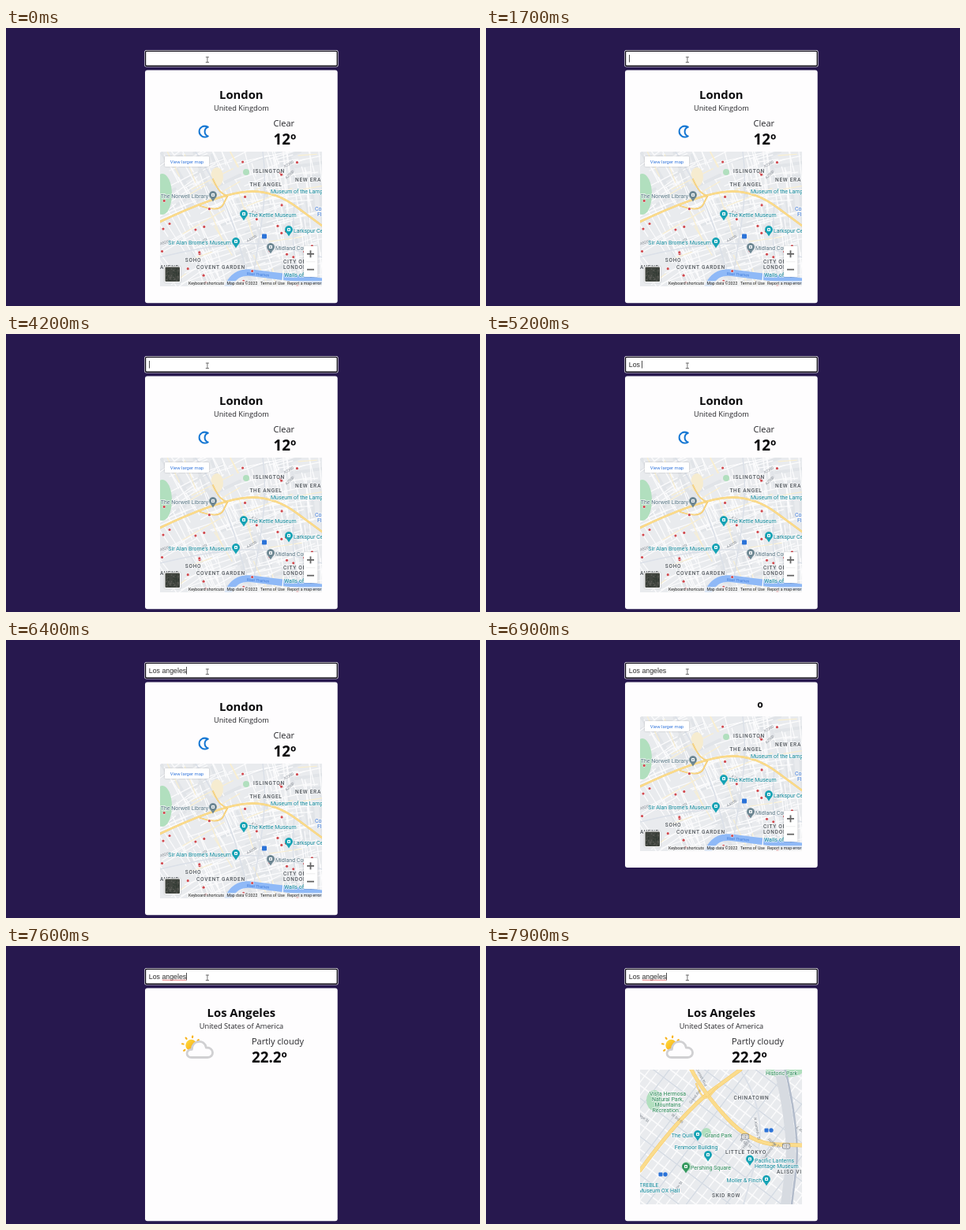
These frames come from a looping animation (600x353 px, 8 s). An HTML page with a canvas:

```html
<!DOCTYPE html>
<html lang="en">
<head>
<meta charset="utf-8">
<title>Weather search</title>
<style>
html, body { margin: 0; width: 100%; height: 100%; overflow: hidden; background: #27184e; }
canvas { display: block; width: 600px; height: 353px; }
</style>
</head>
<body>
<canvas id="stage"></canvas>
<script>
const LOOP = 8000, BLINK = 530;
const SUBMIT = 6800, REPLY = 7000, READY = 7450;
const MAP = { x: 195, y: 157, w: 205, h: 171 };
const UI = '"Open Sans", "Noto Sans", sans-serif';
const LABEL = 'Roboto, Arial, sans-serif';
const FIELD = '"Liberation Sans", Arial, sans-serif';
const INK = '#0b0b0d', TEAL = '#128a9c', GREEN = '#2b8a57', SLATE = '#5c7886', BLUE = '#3c78d8';
const MINOR = '#dbe0e8', PARK = '#b1dfbe';
const dpr = window.devicePixelRatio || 1;

function surface(canvas, w, h) {
  canvas.width = Math.round(w * dpr);
  canvas.height = Math.round(h * dpr);
  const c = canvas.getContext('2d');
  c.scale(dpr, dpr);
  return c;
}

function random(seed) {
  return () => (seed = (seed * 16807) % 2147483647) / 2147483647;
}

function text(c, str, x, y, font, color, align = 'left', halo = false) {
  c.font = font;
  c.textAlign = align;
  if (halo) {
    c.lineWidth = 1.8;
    c.strokeStyle = '#f5f6f8b0';
    c.strokeText(str, x, y);
  }
  c.fillStyle = color;
  c.fillText(str, x, y);
}

function box(c, x, y, w, h, r, color) {
  c.fillStyle = color;
  c.beginPath();
  c.roundRect(x, y, w, h, r);
  c.fill();
}

function blob(c, x, y, rx, ry, color) {
  c.fillStyle = color;
  c.beginPath();
  c.ellipse(x, y, rx, ry, 0, 0, 7);
  c.fill();
}

// Smooth line steered by a few key points.
function road(c, pts, width, color) {
  c.lineWidth = width;
  c.strokeStyle = color;
  c.beginPath();
  c.moveTo(...pts[0]);
  for (let i = 1; i < pts.length - 1; i++) {
    const [x, y] = pts[i], [u, v] = pts[i + 1];
    c.quadraticCurveTo(x, y, (x + u) / 2, (y + v) / 2);
  }
  c.lineTo(...pts[pts.length - 1]);
  c.stroke();
}

function highway(c, pts, width) {
  road(c, pts, width + 0.8, '#f3c769');
  road(c, pts, width, '#fbdc8c');
}

function turned(c, str, x, y, angle, color = '#81878f') {
  c.save();
  c.translate(x, y);
  c.rotate(angle);
  text(c, str, 0, 1.5, `4.7px ${LABEL}`, color, 'center');
  c.restore();
}

function place(c, str, x, y, color, align) {
  text(c, str, x, y, `7px ${LABEL}`, color, align, true);
}

function district(c, str, x, y, align = 'center') {
  c.letterSpacing = '0.7px';
  text(c, str, x, y, `500 6.6px ${LABEL}`, '#51565c', align, true);
  c.letterSpacing = '0px';
}

function pin(c, x, y, color) {
  c.fillStyle = color;
  c.beginPath();
  c.arc(x, y - 1, 5, 2.6, 0.54);
  c.quadraticCurveTo(x + 2, y + 4, x, y + 7.5);
  c.quadraticCurveTo(x - 2, y + 4, x - 4.3, y + 1.6);
  c.fill();
  box(c, x - 2, y - 3, 4, 4, 0.8, '#fff');
  box(c, x - 0.8, y - 1.7, 1.6, 1.6, 0, color);
}

// A pin with its label on one side.
function spot(c, str, x, y, color, left) {
  pin(c, x, y, { [TEAL]: '#16a3b5', [GREEN]: '#34985e', [SLATE]: '#6d8793' }[color]);
  const side = left ? -6 : 6;
  str.split('\n').forEach((s, i) => place(c, s, x + side, y + 3 + i * 7, color, left ? 'right' : 'left'));
}

function newMap(paint) {
  const canvas = document.createElement('canvas');
  const c = surface(canvas, MAP.w, MAP.h);
  c.translate(-MAP.x, -MAP.y);
  c.lineJoin = c.lineCap = 'round';
  c.fillStyle = '#e9ebee';
  c.fillRect(MAP.x, MAP.y, MAP.w, MAP.h);
  paint(c, random(71));
  return canvas;
}

function scatter(rnd, count, put) {
  for (let i = 0; i < count; i++) put(MAP.x + rnd() * MAP.w, MAP.y + rnd() * MAP.h, i);
}

function streets(c, rnd, count, color, width) {
  scatter(rnd, count, (x, y, i) => {
    const a = -0.35 + (x - 300) * 0.002 + (i % 2) * Math.PI / 2 + (rnd() - 0.5) * 0.3;
    const l = 8 + rnd() * 24, dx = Math.cos(a) * l, dy = Math.sin(a) * l;
    road(c, [[x - dx, y - dy], [x + dx, y + dy]], width, color);
  });
}

function paintLondon(c, rnd) {
  streets(c, rnd, 50, '#e1e4e8', 4);
  streets(c, rnd, 230, '#fcfcfd', 1.2);
  streets(c, rnd, 22, '#faefcf', 1.1);
  blob(c, 198, 211, 12, 26, PARK);
  blob(c, 267, 189, 8, 12, '#f6ecd0');
  blob(c, 304, 183, 4, 4, PARK);

  road(c, [[325, 157], [331, 200], [314, 308]], 1.5, MINOR);
  road(c, [[240, 157], [278, 215], [305, 310]], 1.5, MINOR);
  road(c, [[195, 291], [300, 265], [400, 291]], 1.5, MINOR);
  road(c, [[365, 222], [362, 265], [368, 310]], 1.5, MINOR);
  highway(c, [[195, 246], [262, 214], [335, 203], [400, 251]], 1.8);
  highway(c, [[246, 226], [270, 234], [280, 214]], 1);
  highway(c, [[262, 192], [268, 206], [280, 214]], 1);

  road(c, [[281, 328], [290, 308], [335, 314], [402, 322]], 8.5, '#8fb9f7');
  road(c, [[351, 308], [350, 323]], 1.3, '#fff');
  turned(c, 'River Thames', 319, 313, 0.07, BLUE);
  scatter(rnd, 7, (x, y, i) => turned(c, 'A' + (5200 - i * 600), x, y, (rnd() - 0.5) * 2));
  scatter(rnd, 34, (x, y) => {
    blob(c, x, y, 2, 2, '#fff');
    blob(c, x, y, 1.6, 1.6, '#cf4a50');
  });
  box(c, 324, 261.5, 6, 6, 1, '#2b73d8');

  district(c, 'ISLINGTON', 333, 184);
  district(c, 'THE ANGEL', 329, 201);
  district(c, 'NEW ERA ESTATE', 366, 195, 'left');
  district(c, 'SOHO', 237, 297);
  district(c, 'COVENT GARDEN', 272, 306);
  district(c, 'AVEND', 195, 306, 'left');
  district(c, 'CITY OF', 351, 299, 'left');
  district(c, 'LONDON', 351, 306, 'left');
  place(c, 'Museum of the Lamp', 335, 209.5, TEAL);
  place(c, 'Walls of', 352, 316, TEAL);
  place(c, 'Col', 391, 232, BLUE);
  place(c, 'Fl', 394, 239, BLUE);
  spot(c, 'The Norwell Library', 262, 213, SLATE, true);
  spot(c, 'The Kettle Museum', 301, 237, TEAL);
  spot(c, "Sir Alan Brome's Museum", 291, 272, TEAL, true);
  spot(c, 'Larkspur Centre', 358, 257, TEAL);
  spot(c, 'Midland Court', 335, 279, SLATE);
  paintControls(c, rnd);
}

function paintControls(c, rnd) {
  c.shadowColor = '#0004';
  c.shadowBlur = 2 * dpr;
  box(c, 201, 163, 56, 13, 1, '#fff');
  box(c, 377, 277, 17.5, 39, 1, '#fff');
  box(c, 200.5, 302.5, 20.5, 20.5, 1.5, '#fff');
  c.shadowBlur = 0;
  text(c, 'View larger map', 229, 171.5, `5.9px ${LABEL}`, '#3477dc', 'center');
  box(c, 380, 296.5, 11.5, 0.7, 0, '#e4e4e4');
  box(c, 381, 286, 9, 1.8, 0, '#666');
  box(c, 384.6, 282.4, 1.8, 9, 0, '#666');
  box(c, 381, 305.8, 9, 1.8, 0, '#666');
  box(c, 201.5, 303.5, 18.5, 18.5, 1, '#41453f');
  for (let i = 0; i < 45; i++) {
    box(c, 202 + rnd() * 16, 304 + rnd() * 16, 1.5, 1.5, 0, i % 2 ? '#5b5c57' : '#313a33');
  }
  box(c, 230, 321, 170, 7, 0, '#f5f5f5c0');
  const small = `5.2px ${LABEL}`;
  text(c, 'Keyboard shortcuts', 231, 326, small, '#222');
  text(c, 'Map data ©2022', 279.5, 326, small, '#222');
  text(c, 'Terms of Use', 322, 326, small, '#222');
  text(c, 'Report a map error', 356, 326, small, '#222');
}

const SLOPE = 37 * Math.PI / 180;

function grid(c, angle, step, color, width) {
  c.save();
  c.translate(290, 245);
  c.rotate(angle);
  c.fillStyle = color;
  for (let p = -180; p < 180; p += step) c.fillRect(-180, p, 360, width);
  c.restore();
}

function shield(c, x, y) {
  box(c, x - 5, y - 3.5, 10, 7, 2, '#5d6470');
  box(c, x - 4.3, y - 2.8, 8.6, 5.6, 1.5, '#fff');
  text(c, '101', x, y + 1.7, `4.6px ${LABEL}`, '#444', 'center');
}

function metro(c, x, y) {
  box(c, x - 2.5, y - 2.5, 5, 5, 1, '#2b73d8');
  blob(c, x + 6, y, 2.7, 2.7, '#2b73d8');
}

function paintAngeles(c, rnd) {
  const cross = SLOPE - Math.PI / 2;
  grid(c, SLOPE, 13, '#fbfbfc', 1.6);
  grid(c, cross, 10, '#fbfbfc', 1.4);
  grid(c, SLOPE, 39, '#d5dbe3', 1.6);
  grid(c, cross, 40, '#d5dbe3', 1.6);
  blob(c, 378, 158, 24, 9, PARK);
  blob(c, 213, 196, 10, 13, PARK);
  blob(c, 279, 237, 6, 6, PARK);
  blob(c, 254, 280, 6, 6, PARK);
  road(c, [[371, 157], [390, 240], [379, 328]], 12, '#d7dbe1');
  road(c, [[379, 157], [398, 240], [387, 328]], 2.5, '#b3bccb');
  road(c, [[322, 157], [358, 215], [326, 328]], 1.8, MINOR);
  highway(c, [[195, 285], [250, 210], [322, 157]], 4);
  highway(c, [[260, 157], [275, 186], [335, 251], [400, 253]], 4);
  highway(c, [[266, 175], [275, 200], [293, 179]], 1.3);

  turned(c, 'Sunset Blvd', 273, 167, 1.1);
  const names = ['W College St', 'N Hill St', 'Alpine St', 'Grand Ave', 'W 3rd St', 'S Main St', 'E 4th St', 'Diamond Rd', 'W 6th St'];
  scatter(rnd, names.length, (x, y, i) => turned(c, names[i], x, y, i % 2 ? cross : SLOPE));
  turned(c, 'N Alameda St', 343, 232, 1.4);
  shield(c, 328, 242);
  shield(c, 380, 254);
  metro(c, 355, 234);
  metro(c, 221, 290);

  place(c, 'Historic Park', 374, 163.5, GREEN, 'center');
  ['Vista Hermosa', 'Natural Park,', 'Mountains', 'Recreation...'].forEach((s, i) =>
    place(c, s, 230, 189.5 + i * 7, GREEN, 'center'));
  district(c, 'CHINATOWN', 336, 195);
  district(c, 'LITTLE TOKYO', 329, 263.5);
  district(c, 'ALISO VILLAGE', 368, 289, 'left');
  district(c, 'SKID ROW', 304, 319);
  place(c, 'Grand Park', 277, 242.5, GREEN);
  place(c, 'Fenmoor Building', 266, 257.5, TEAL, 'center');
  place(c, 'TREBLE', 194, 306, TEAL);
  place(c, 'Museum OX Hall', 193, 313, TEAL);
  pin(c, 281, 266, '#16a3b5');
  spot(c, 'The Quill', 268, 240, TEAL, true);
  spot(c, 'Pacific Lanterns\nHeritage Museum', 334, 271.5, TEAL);
  spot(c, 'Pershing Square', 253, 281, GREEN);
  spot(c, 'Moller & Finch', 355, 297, TEAL, true);
}

const ctx = surface(document.getElementById('stage'), 600, 353);
const london = newMap(paintLondon);
const angeles = newMap(paintAngeles);

// Each entry types its text from `at`, one letter per `gap`, then stays until `end`.
const typing = [
  { str: 'C', at: 2030, gap: 1, end: 4200 },
  { str: 'Los ', at: 4950, gap: 80, end: LOOP },
  { str: 'angeles', at: 5500, gap: 148, end: LOOP }
];

function fieldState(t) {
  let value = '', since = BLINK / 2 - 1025;
  for (const { str, at, gap, end } of typing) {
    if (t < at) break;
    const n = Math.min(str.length, Math.floor((t - at) / gap) + 1);
    value += t < end ? str.slice(0, n) : '';
    since = t < end ? at + (n - 1) * gap : end;
  }
  return { value, since: t < READY ? since : READY };
}

function drawField(t) {
  box(ctx, 175.2, 28, 245.4, 21.6, 2.5, '#e9e6ee');
  box(ctx, 175.9, 28.7, 244, 20.2, 2, '#0e0b16');
  box(ctx, 177.2, 30, 241.4, 17.6, 1, '#fff');
  const { value, since } = fieldState(t);
  text(ctx, value, 180.8, 41.5, `8.8px ${FIELD}`, '#2b2b2b');
  const x = 180.8 + ctx.measureText(value).width;
  const lit = Math.floor((t - since) / BLINK) % 2 === 0;
  if (lit && (t < SUBMIT || t >= READY)) box(ctx, Math.round(x), 34, 0.8, 9.5, 0, '#222');
  if (t >= READY) {
    ctx.strokeStyle = '#e05050';
    ctx.lineWidth = 0.8;
    ctx.beginPath();
    for (let u = 198; u <= 228; u++) ctx.lineTo(u, 43.3 + (u % 2 ? 0.5 : -0.5));
    ctx.stroke();
  }
}

const arrow = new Path2D('M254.3 40v7l1.6-1.4 1.1 2.4 1-.5-1-2.3 2-.2z');
const beam = new Path2D('M253.2 37h3.4M253.2 43.5h3.4M254.9 37v6.5');
const moon = new Path2D('M255.8 125.7C249 122.6 244.6 127 244.6 131.6S249.5 140.5 255.8 137.4C250.2 135.5 250.2 127.6 255.8 125.7z');
const cloud = new Path2D('M235 141.5C227 141.5 227 131.5 235.3 131.3 236 119 251.5 118 253.3 129 264 128.5 264 141.5 255 141.5z');

function outline(path, width, color, fill) {
  if (fill) {
    ctx.fillStyle = fill;
    ctx.fill(path);
  }
  ctx.lineWidth = width;
  ctx.strokeStyle = color;
  ctx.stroke(path);
}

function drawCloud() {
  for (let i = 2; i < 10; i++) {
    const a = i * Math.PI / 4 + 0.15, dx = Math.cos(a), dy = Math.sin(a);
    road(ctx, [[234.5 + dx * 10, 126 + dy * 10], [234.5 + dx * 11.6, 126 + dy * 11.6]], 2.2, '#f8b420');
  }
  const glow = ctx.createLinearGradient(229, 120, 241, 133);
  glow.addColorStop(0, '#ffd83c');
  glow.addColorStop(1, '#f5a30c');
  blob(ctx, 234.5, 126, 7.2, 7.2, glow);
  outline(cloud, 2.8, '#d0d0d2', '#fefdfe');
}

function drawReport(city, country, sky, temp, x) {
  text(ctx, city, 297.8, 90, `700 14.8px ${UI}`, INK, 'center');
  text(ctx, country, 298, 104.6, `9.25px ${UI}`, '#26262a', 'center');
  text(ctx, sky, x, 125.3, `11px ${UI}`, '#26262a');
  text(ctx, temp, x, 148, `700 18.8px ${UI}`, INK);
}

function drawMap(map, dy = 0) {
  ctx.drawImage(map, MAP.x, MAP.y + dy, MAP.w, MAP.h);
}

function draw(t) {
  const waiting = t >= SUBMIT && t < REPLY;
  box(ctx, 0, 0, 600, 353, 0, '#27184e');
  drawField(t);
  box(ctx, 176, 53.5, 243.7, waiting ? 235.5 : 295.7, 3, '#fefdfe');
  if (t < SUBMIT) {
    drawReport('London', 'United Kingdom', 'Clear', '12º', 338.5);
    outline(moon, 2, '#1577d3');
    drawMap(london);
  } else if (waiting) {
    text(ctx, 'º', 347, 93.3, `700 19.5px ${UI}`, INK, 'center');
    drawMap(london, -60);
  } else {
    drawReport('Los Angeles', 'United States of America', 'Partly cloudy', '22.2º', 311);
    drawCloud();
    ctx.globalAlpha = Math.min(1, Math.max(0, (t - 7650) / 200));
    drawMap(angeles);
    ctx.globalAlpha = 1;
  }
  if (t >= REPLY && t < READY) outline(arrow, 0.8, '#444', '#fff');
  else outline(beam, 0.8, '#555');
}

ctx.lineJoin = ctx.lineCap = 'round';
const start = performance.now();
function tick() {
  draw((performance.now() - start) % LOOP);
  requestAnimationFrame(tick);
}
tick();
</script>
</body>
</html>
```
